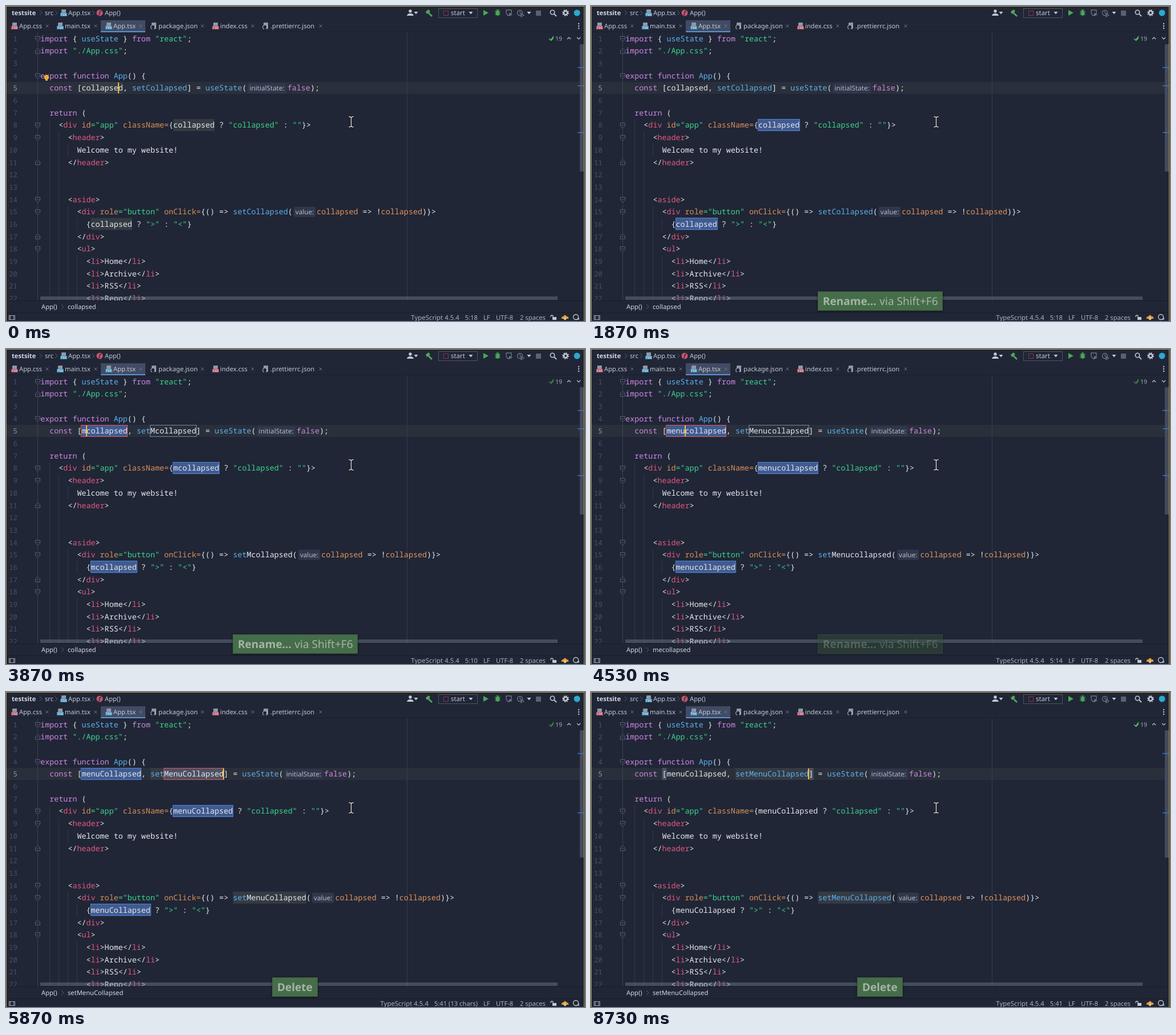
Write an HTML page with a canvas that moves like this. It is 1014 by 552 pixels and loops after 8790 ms.

```html
<!DOCTYPE html>
<html lang="en">
<head>
<meta charset="utf-8">
<title>Rename refactoring</title>
<style>
html, body { margin: 0; width: 100%; height: 100%; overflow: hidden; background: #202636; }
canvas { display: block; width: 1014px; height: 552px; }
</style>
</head>
<body>
<canvas width="1014" height="552"></canvas>
<script>
const ctx = document.querySelector('canvas').getContext('2d');
ctx.textRendering = 'geometricPrecision';

const LOOP = 8790, CHAR = 8.03, ROW = 21.67;
const mono = (size = 13.38) => `500 ${size}px "Noto Sans Mono", "DejaVu Sans Mono", monospace`;
const ui = (size = 11.2, weight = 400) => `${weight} ${size}px "Noto Sans", "Open Sans", sans-serif`;
const INK = '#c3c8d2', DIM = '#6b7385', GREEN = '#4ba758';
const SYNTAX = {
  str: '#3bd48c', tag: '#e4577f', kw: '#cf86e2', attr: '#dd9058',
  fn: '#5cb0ec', param: '#e2945c', plain: '#e4e7ec'
};
const TOKEN = new RegExp([
  '«(?<hint>.+?)»', '(?<str>=?"[^"]*")', '(?<tag>(?<=<\\/?)[a-z]+)',
  '(?<kw>\\b(?:import|from|export|function|const|return|false)\\b)',
  '(?<attr>\\b(?:id|className|role|onClick)\\b(?:=(?={))?)',
  '(?<fn>\\b(?:useState|App|set\\w+)\\b)', '(?<param>(?<=»|=> !)collapsed)', '\\w+', '.'
].join('|'), 'g');

const colX = col => 60.2 + col * CHAR;
const rowY = line => 46.4 + (line - 1) * ROW;
const capital = s => s[0].toUpperCase() + s.slice(1);

function rect(x, y, w, h, color) {
  ctx.fillStyle = color;
  ctx.fillRect(x, y, w, h);
}
function frame(x, y, w, h, color) {
  ctx.strokeStyle = color;
  ctx.lineWidth = 1;
  ctx.strokeRect(Math.round(x) + .5, Math.round(y) + .5, Math.round(w) - 1, Math.round(h) - 1);
}
function text(s, x, y, color = INK, font = ui(), align = 'left') {
  ctx.font = font;
  ctx.textAlign = align;
  ctx.fillStyle = color;
  ctx.fillText(s, x, y);
  return ctx.measureText(s).width;
}
// Path drawn relative to x, y; filled when no line width is given.
function shape(d, x, y, color, width) {
  ctx.save();
  ctx.translate(x, y);
  const path = new Path2D(d);
  ctx.fillStyle = ctx.strokeStyle = color;
  ctx.lineWidth = width;
  width ? ctx.stroke(path) : ctx.fill(path);
  ctx.restore();
}
function disc(x, y, r, color, width) {
  ctx.beginPath();
  ctx.arc(x, y, r, 0, 7);
  ctx.fillStyle = ctx.strokeStyle = color;
  ctx.lineWidth = width;
  width ? ctx.stroke() : ctx.fill();
}
function panel(x, y, w, h, fill, border) {
  ctx.save();
  ctx.shadowColor = '#0008';
  ctx.shadowBlur = 4;
  ctx.shadowOffsetY = 1;
  rect(x, y, w, h, fill);
  ctx.restore();
  frame(x, y, w, h, border);
}
const chevron = (x, y) => shape('M-2-4L2 0L-2 4', x, y, '#535b6e', 1);
const caretDown = (x, y, color = INK) => shape('M-3.5-2H3.5L0 2.5Z', x, y, color);
const ellipsis = (x, y) => [-4, 0, 4].forEach(d => disc(x, y + d, 1.2, INK));

function fileIcon(type, x, y) {
  shape('M3-6H10V5H2V-5Z', x, y, '#8f98a8');
  if (type === 'json') {
    rect(x, y - 1, 7, 7, '#202636');
    shape('M3-1Q1-1 1 1Q1 2 0 2Q1 2 1 4Q1 5 3 5M6-1Q8-1 8 1Q8 2 9 2Q8 2 8 4Q8 5 6 5', x, y, '#aab2c0', 1.1);
    return;
  }
  rect(x, y, 12, 6, type === 'css' ? '#b84a60' : '#3f92b8');
  text(type.toUpperCase(), x + 6, y + 5, '#dfe5ee', ui(5.5, 700), 'center');
}

function state(t) {
  const after = ms => t >= ms;
  const during = (a, b) => t >= a && t < b;
  // Last value whose start time has been reached.
  const pickAt = (time, first, ...steps) => steps.reduce((v, [ms, next]) => time >= ms ? next : v, first);
  const pick = (...args) => pickAt(t, ...args);
  const caretAt = time => pickAt(time, 17, [3000, 8], [3060, 9], [3870, 10], [4070, 11],
    [4270, 12], [4470, 13], [5400, 14], [5730, 40]);
  const ramp = (a, b) => Math.min(1, Math.max(0, (t - a) / (b - a)));
  return {
    name: pick('collapsed', [3870, 'mcollapsed'], [4070, 'mecollapsed'], [4270, 'mencollapsed'],
      [4470, 'menucollapsed'], [5000, 'menuollapsed'], [5400, 'menuCollapsed']),
    crumb: pick('collapsed', [4400, 'mecollapsed'], [4670, 'menucollapsed'], [5600, 'menuCollapsed'], [5800, 'setMenuCollapsed']),
    caret: caretAt(t),
    column: caretAt(t - 60) + 1,
    caretOn: !during(530, 1930),
    chars: pick('', [2000, ' (9 chars)'], [3000, ''], [5800, ' (13 chars)'], [6400, '']),
    occurrences: !after(470),
    linked: during(470, 6330),
    template: during(2000, 6330),
    onSetter: after(5730),
    selected: during(2000, 3000),
    done: after(6330),
    choice: during(600, 1870),
    completion: during(2270, 3000),
    checking: during(2130, 7270),
    marks: after(5800) ? [108, 212] : [108, 140, 222],
    renameToast: ramp(70, 270) * (1 - ramp(4400, 4600)),
    deleteToast: ramp(5000, 5200)
  };
}

function drawToolbar() {
  text('testsite', 10, 16, '#d3d7df', ui(11.2, 700));
  chevron(61, 12);
  text('src', 68, 16);
  chevron(88, 12);
  fileIcon('tsx', 95, 12);
  text('App.tsx', 109, 16);
  chevron(153, 12);
  disc(164, 12, 5.5, '#c9566f');
  text('f', 164, 15, '#2a2430', 'italic 700 9px "Noto Serif", serif', 'center');
  text('App()', 173, 16);

  disc(708, 9, 2.7, INK);
  shape('M-6 5Q-5 1 0 1Q5 1 6 5Z', 708, 12, INK);
  caretDown(718, 12);
  shape('M-6-2L-1-6L2-3L0-1L6 5L4 7L-2 1L-4 2Z', 741, 12, '#55a35f');
  frame(757, 4, 69, 17, '#4a5368');
  frame(766, 8, 9, 9, '#8c2f45');
  text('start', 779, 16, INK, ui(11.5));
  caretDown(814, 12);
  shape('M-4-5L5 0L-4 5Z', 840, 12, GREEN);
  shape('M-5-3H5M-5 0H5M-5 3H5M-2-6L0-4L2-6', 861, 12, GREEN, 1.2);
  shape('M-3-2Q0-6 3-2V3Q0 7-3 3Z', 861, 12, GREEN);
  shape('M-5-5H4V0Q3 4-1 5Q-5 3-5-1Z', 881, 12, DIM, 1.4);
  shape('M0 0L6 3L0 6Z', 881, 12, DIM);
  disc(900, 12, 4.5, DIM, 1.4);
  shape('M0-3V0H2M2 1L7 4L2 7Z', 900, 12, DIM, 1.2);
  caretDown(916, 12);
  rect(928, 8, 9, 9, '#596174');
  disc(957, 11, 3.7, INK, 1.6);
  shape('M3 3L7 7', 957, 11, INK, 1.8);
  disc(980, 12, 3.2, INK, 2.4);
  ctx.setLineDash([2, 1.9]);
  disc(980, 12, 5, INK, 1.8);
  ctx.setLineDash([]);
  disc(1000, 12, 5.5, '#2ba9cf');
}

function drawTabs() {
  rect(0, 45, 1014, 1, '#1a1f2c');
  rect(166, 25, 78, 21, '#414b64');
  rect(166, 44, 78, 2, '#5a92d6');
  const tabs = [['App.css', 9, 72], ['main.tsx', 89, 157], ['App.tsx', 174, 236],
    ['package.json', 253, 344], ['index.css', 361, 432], ['.prettierrc.json', 449, 551]];
  for (const [name, x, close] of tabs) {
    fileIcon(name.split('.').pop(), x, 35);
    text(name, x + 14, 39);
    shape('M-2.5-2.5L2.5 2.5M2.5-2.5L-2.5 2.5', close, 35, DIM, 1);
  }
  ellipsis(1003, 35);
}

function drawGutter() {
  rect(55, 46, 1, 470, '#394154');
  for (let n = 1; n <= 22; n++)
    text(n, 20, rowY(n) + 15.4, n === 5 ? '#8d96a8' : '#475067', mono(12.4), 'right');
  const fold = { 1: 1, 2: -1, 4: 1, 8: 1, 9: 1, 11: -1, 14: 1, 15: 1, 17: -1, 18: 1 };
  for (const [line, dir] of Object.entries(fold)) {
    const y = rowY(+line) + 11;
    const d = `M-4 ${-4 * dir}H4V${dir}L0 ${5 * dir}L-4 ${dir}Z`;
    shape(d, 55.5, y, '#202636');
    shape(d + 'M-2 0H2', 55.5, y, '#596277', 1);
  }
  const guides = [[2, 8, 23], [4, 9, 23], [6, 10, 11], [6, 15, 23], [8, 16, 17], [8, 19, 23]];
  for (const [col, from, to] of guides)
    rect(Math.round(colX(col)), rowY(from), 1, rowY(to) - rowY(from), '#2f374a');
}

function drawCode(line, col, source, setterSplit) {
  const y = rowY(line) + 15.4;
  let x = colX(col);
  for (const { 0: token, groups } of source.matchAll(TOKEN)) {
    if (groups.hint) {
      ctx.font = ui(11.7);
      const w = ctx.measureText(groups.hint).width;
      ctx.beginPath();
      ctx.roundRect(x + 2, y - 13.5, w + 6, 18, 3);
      ctx.fillStyle = '#30374a';
      ctx.fill();
      text(groups.hint, x + 5, y - .5, '#b4bac6', ui(11.7));
      x += w + 10;
      continue;
    }
    const kind = Object.keys(SYNTAX).find(k => groups[k]) || 'plain';
    if (setterSplit && token.startsWith('set')) {
      text('set', x, y, SYNTAX.fn, mono());
      text(token.slice(3), x + 3 * CHAR, y, SYNTAX.plain, mono());
    } else if (token !== ' ') text(token, x, y, SYNTAX[kind], mono());
    x += token.length * CHAR;
  }
}

function mark(line, col, length, fill, border) {
  const x = colX(col), y = rowY(line), w = length * CHAR;
  if (fill) rect(x, y, w, 21, fill);
  if (border) frame(x - 1, y, w + 2, 21, border);
}

function drawMarks(s) {
  const n = s.name.length, setter = n + 11;
  const OCCURRENCE = '#343b43', LINK = '#415b8f', LINK_EDGE = '#4f83e0';
  const ACTIVE = '#e0525e', SELECTED = '#4d5263';
  rect(1, 133, 1004, 21, '#2a303b');
  if (s.occurrences) [[5, 9], [8, 29], [16, 11]].forEach(([l, c]) => mark(l, c, n, OCCURRENCE));
  if (s.linked) [[8, 29], [16, 11]].forEach(([l, c]) => mark(l, c, n, LINK, LINK_EDGE));
  if (s.onSetter) {
    mark(5, setter, n + 3, OCCURRENCE);
    mark(15, 42, n + 3, OCCURRENCE);
  }
  if (s.template) {
    mark(5, 9, n, s.selected ? SELECTED : LINK, s.onSetter ? LINK_EDGE : ACTIVE);
    mark(5, setter + 3, n, s.onSetter ? SELECTED : null, s.onSetter ? ACTIVE : '#7d8595');
  }
  if (s.done) [8, setter + n + 3].forEach(c => mark(5, c, 1, '#4a5264'));
}

function drawEditor(s) {
  const { name } = s, setter = 'set' + capital(name);
  ctx.save();
  ctx.beginPath();
  ctx.rect(0, 46, 1014, 470);
  ctx.clip();
  drawMarks(s);
  drawGutter();
  rect(702, 46, 1, 470, '#343c50');
  const lines = [
    [1, 0, 'import { useState } from "react";'],
    [2, 0, 'import "./App.css";'],
    [4, 0, 'export function App() {'],
    [5, 2, `const [${name}, ${setter}] = useState(«initialState:»false);`, s.template],
    [7, 2, 'return ('],
    [8, 4, `<div id="app" className={${name} ? "collapsed" : ""}>`],
    [9, 6, '<header>'],
    [10, 8, 'Welcome to my website!'],
    [11, 6, '</header>'],
    [14, 6, '<aside>'],
    [15, 8, `<div role="button" onClick={() => ${setter}(«value:»collapsed => !collapsed)}>`, s.template],
    [16, 10, `{${name} ? ">" : "<"}`],
    [17, 8, '</div>'],
    [18, 8, '<ul>'],
    ...['Home', 'Archive', 'RSS', 'Repo'].map((item, i) => [19 + i, 10, `<li>${item}</li>`])
  ];
  lines.forEach(line => drawCode(...line));
  if (s.caretOn) rect(Math.round(colX(s.caret)) - 1, 134, 2, 19, '#f2bd3c');
  if (s.occurrences) {
    disc(71, 125, 4.2, '#f0ae2c');
    rect(69, 129, 4, 2, '#a8adb7');
  }
  rect(60, 509, 906, 6, '#7d859466');
  rect(1005, 67, 7, 223, '#7d859466');
  s.marks.forEach(y => rect(1001, y - 1, 11, 1.5, '#3d75c4'));
  ctx.restore();

  const check = s.checking ? '#3a7a47' : '#4fb85d';
  shape('M-4 0L-1 3L4-4M-1 1L0 3L4-1', 955, 57, check, 1.6);
  text('19', 962, 61, '#a2a9b7', ui(10.5));
  shape('M-3 2L0-1L3 2', 986, 56, INK, 1.2);
  shape('M-3-1L0 2L3-1', 1003, 56, INK, 1.2);
}

function drawPopups(s) {
  if (s.choice) {
    panel(196, 153, 150, 60, '#1e2431', '#151a25');
    rect(197, 175, 148, 18, '#363e4f');
    text('String occurrences found', 205, 168, '#b0b6c2');
    text('Rename code occurrences', 202, 188.5, '#c9ced7');
    text('Rename all occurrences', 202, 205.5, '#b0b6c2');
  }
  if (s.completion) {
    panel(126, 153, 225, 119, '#464749', '#55575a');
    ['b', 'useStateElement', 'first', 'firstB', 'firstUseStateElement'].forEach((item, i) =>
      text(item, 132, 168.5 + i * 19.3, '#b9bbbe', mono()));
    text('Press Enter or Tab to replace', 135, 265, '#6e7074', ui(9.6));
    ellipsis(341, 261);
  }
}

function drawStatus(s) {
  rect(0, 516, 1014, 1, '#181d29');
  rect(0, 537, 1014, 1, '#181d29');
  text('App()', 62, 531, '#d3d7df');
  chevron(99, 527);
  text(s.crumb, 108, 531, '#d3d7df');
  frame(5, 542, 11, 8, '#9aa2b0');
  rect(7, 543, 1, 6, '#9aa2b0');
  rect(13, 543, 1, 6, '#9aa2b0');
  const status = '#a9b0bd';
  const width = text(`5:${s.column}${s.chars}`, 826, 549.5, status, ui(), 'right');
  text('TypeScript 4.5.4', 816 - width, 549.5, status, ui(11.4), 'right');
  text('LF', 836, 549.5, status);
  text('UTF-8', 858, 549.5, status);
  text('2 spaces', 900, 549.5, status);
  rect(957, 545, 7, 5, INK);
  shape('M-3 0V-2Q-1-4 1-2V0', 957, 545, INK, 1.2);
  shape('M-6 3Q-7-1-3-1Q0-6 3-1Q7-1 6 3Z', 979, 545, '#e39a35');
  shape('M0-1V5M-2.5 2.5L0 5L2.5 2.5', 979, 545, '#f3d9ac', 1.2);
  disc(998, 545, 4.5, INK, 1.3);
  shape('M2 4H5V1', 998, 545, INK, 1.3);
}

function drawToast(alpha, x, w, title, detail) {
  if (!alpha) return;
  ctx.save();
  ctx.globalAlpha = alpha;
  panel(x, 500, w, 34, '#466d49', '#3b5c40');
  const size = 19;
  const width = text(title, x + 9, 523.5, '#a4b5a6', ui(size, 700));
  text(detail, x + 9 + width + 5.5, 523.5, '#a4b5a6', ui(size));
  ctx.restore();
}

function drawPointer() {
  const d = 'M-4-9Q0-9 0-7Q0-9 4-9M0-7V7M-4 9Q0 9 0 7Q0 9 4 9';
  shape(d, 604.5, 203, '#111', 3);
  shape(d, 604.5, 203, '#eee', 1.3);
}

function draw(now) {
  const s = state(now % LOOP);
  rect(0, 0, 1014, 552, '#202636');
  drawToolbar();
  drawTabs();
  drawEditor(s);
  drawStatus(s);
  drawPopups(s);
  drawToast(s.renameToast, 397, 219, 'Rename…', 'via Shift+F6');
  drawToast(s.deleteToast, 466, 80, 'Delete', '');
  drawPointer();
  frame(0, 0, 1013, 560, '#c09a48');
  requestAnimationFrame(draw);
}
requestAnimationFrame(draw);
</script>
</body>
</html>
```
